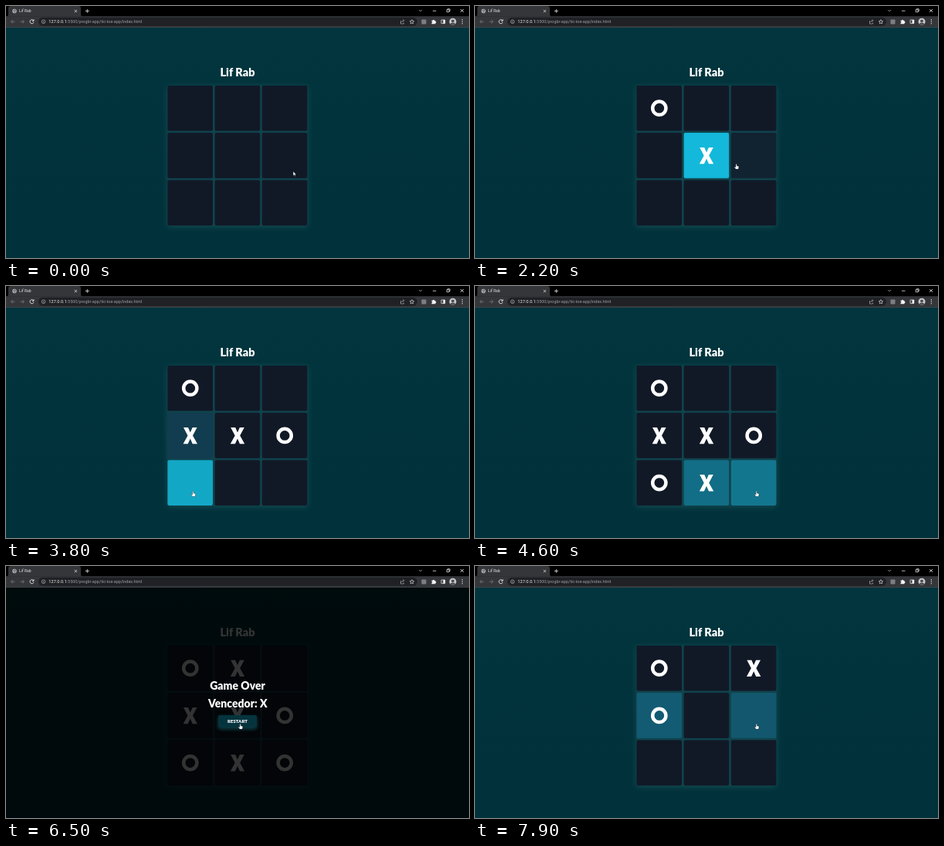
An HTML page that plays this animation: 600 by 326 pixels, repeating every 8 s.

```html
<!DOCTYPE html>
<html lang="en">
<head>
<meta charset="utf-8">
<title>Lif Rab</title>
<style>
  html, body { margin: 0; width: 100%; height: 100%; overflow: hidden; background: #01323b; }
  svg { display: block; width: 100vw; height: 100vh; }
  .ui { font-family: Roboto, "Open Sans", sans-serif; }
  .head { font: 900 14px Lato, "Open Sans", sans-serif; fill: #fff; text-anchor: middle; }
  .line { fill: none; stroke: #e4e6e8; stroke-width: .8; }
</style>
</head>
<body>
<svg viewBox="0 0 600 326" preserveAspectRatio="none">
  <defs>
    <linearGradient id="sky" x2="0" y2="1">
      <stop stop-color="#02353e"/><stop offset="1" stop-color="#01313a"/>
    </linearGradient>
    <filter id="blur" x="-20%" y="-20%" width="140%" height="140%"><feGaussianBlur stdDeviation="3.5"/></filter>
    <filter id="soft" x="-30%" y="-80%" width="160%" height="260%"><feGaussianBlur stdDeviation="2.4"/></filter>
    <clipPath id="face"><circle cx="579" cy="20.3" r="4.5"/></clipPath>
  </defs>

  <!-- page -->
  <rect y="27" width="600" height="299" fill="url(#sky)"/>
  <text class="head" x="300" y="91" style="font-size:14.5px">Lif Rab</text>
  <rect x="209" y="104" width="182" height="182" rx="3" fill="#38767d" opacity=".36" filter="url(#blur)"/>
  <rect x="209.5" y="103" width="181" height="180.5" rx="2" fill="#10434c"/>
  <g id="board"></g>

  <!-- result -->
  <g id="over">
    <rect y="27" width="600" height="299" fill="#000" opacity=".8"/>
    <text class="head" x="300" y="160">Game Over</text>
    <text class="head" x="300.3" y="183">Vencedor: X</text>
    <rect x="275" y="195" width="50" height="16" rx="2" fill="#17606c" opacity=".65" filter="url(#soft)"/>
    <rect x="275" y="193" width="50" height="15.5" rx="2" fill="#05343e"/>
    <text class="head" x="300" y="203" style="font-size:6.1px">RESTART</text>
  </g>

  <!-- browser -->
  <g class="ui">
    <rect width="600" height="13.5" fill="#000"/>
    <path d="M0 13.5Q3 13.5 3 10.5V3Q3 0 6 0H94Q97 0 97 3V10.5Q97 13.5 100 13.5Z" fill="#35363a"/>
    <rect y="13.3" width="600" height="14" fill="#35363a"/>
    <rect y="27" width="600" height=".7" fill="#4a5054"/>
    <rect x="42" y="14.8" width="491" height="11" rx="5.5" fill="#202124"/>
    <circle cx="11" cy="6.6" r="2.8" fill="#aeb3b8"/>
    <path d="M8.7 6h2l1 1.2-1 1.8M11.3 4.2l.4 1.3 1.7.4" fill="none" stroke="#44474b" stroke-width=".8"/>
    <text x="17" y="8.4" font-size="5" fill="#e3e5e8">Lif Rab</text>
    <text x="55.3" y="22.2" font-size="5.43" fill="#9aa0a6"><tspan font-size="5.65" fill="#f1f3f4">127.0.0.1</tspan>:5500/progbr-app/tic-toe-app/index.html</text>
    <g class="line">
      <path d="M88.8 5l3.2 3.2m0-3.2l-3.2 3.2M102.8 6.5h5m-2.5-2.5v5"/>
      <path d="M535.2 5l2 2 2-2" stroke="#aaa"/>
      <path d="M553 6.3h4.4M571.2 4.8h3v3h-3zM572.2 4.7v-.9h3v3h-.9M589 4l4 4m0-4l-4 4"/>
      <path d="M11.5 20.3h-5m2.3-2.3l-2.3 2.3 2.3 2.3M18.5 20.3h5m-2.3-2.3l2.3 2.3-2.3 2.3" stroke="#777a7e"/>
      <path d="M35.5 18.7a2.5 2.5 0 1 0 .4 2.4M36 17.3v2h-2" stroke-width="1"/>
      <circle cx="48.6" cy="20.3" r="2.3" stroke="#b4b8bc" stroke-width=".7"/>
      <path d="M48.6 20v1.4m0-2.5v.5" stroke="#b4b8bc"/>
      <path d="M511.5 19v4h4v-1.5M512.8 21q.2-2.2 3-2.2m-1.3-1.4l1.4 1.4-1.4 1.4" stroke="#a8acb0" stroke-width=".7"/>
      <path d="M526 17.6l.8 1.8 2 .2-1.5 1.3.4 2-1.7-1-1.7 1 .4-2-1.5-1.3 2-.2z" stroke-width=".65"/>
      <rect x="564" y="18" width="4.8" height="4.6" rx=".4"/>
    </g>
    <rect x="538.5" y="17.5" width="6" height="6" rx=".8" fill="#7c7f83"/>
    <path d="M551.5 18.7h1.5a1 1 0 0 1 2 0h1.5v1.3a1 1 0 0 1 0 2v1.3h-5v-1.5a.9.9 0 0 0 0-1.8z" fill="#f1f3f4"/>
    <rect x="566.5" y="18" width="2.5" height="4.6" fill="#f1f3f4"/>
    <g clip-path="url(#face)">
      <rect x="574" y="15" width="10" height="11" fill="#c9cbcd"/>
      <circle cx="579" cy="19.3" r="1.9" fill="#4b4d50"/>
      <ellipse cx="579" cy="25" rx="3.5" ry="3.4" fill="#4b4d50"/>
    </g>
    <path d="M591.3 17.7v.1m0 2.4v.1m0 2.4v.1" stroke="#f1f3f4" stroke-width="1.2" stroke-linecap="round"/>
  </g>

  <g id="arrow"><path d="M0 0V5.4L1.3 4.2 2.2 6.1 3.1 5.7 2.2 3.9H3.9Z" fill="#fff" stroke="#111" stroke-width=".35"/></g>
  <g id="hand"><path d="M-.7 .6Q0 -.5 .6 .6V2.6L2.6 3.1Q3.3 3.3 3.2 4.2L2.7 7H-.7L-2.5 4.5Q-2.5 3.5-1.5 4L-.7 4.7Z" fill="#fff" stroke="#111" stroke-width=".35"/></g>
</svg>

<script>
const LOOP = 8000, FADE = 400, STEP = 10;
const TRAVEL = 110;     // pointer time between two cells
const PRESS = 20;       // click this long before leaving a cell
const BASE = [17, 25, 39], HOVER = [20, 202, 238];
const LEFT = 209.4, TOP = 102.9, PITCH = 61.2, SIZE = 58.6;
const LINES = "012 345 678 036 147 258 048 246".split(" ");

// pointer wanders over the window, then hops: cell, time it leaves
const wander = [[372, 214], [420, 243], [562, 100], [40, 12], [52, 6]];
const WANDER_STEP = 330, PLAY = WANDER_STEP * (wander.length - 1);
const hops = [
  [0, 1755], [4, 2138], [5, 2490], [4, 2892], [3, 3450], [6, 3930], [7, 4345], [8, 4840],
  [1, 5300], [4, 6530], [0, 6910], [2, 7270], [3, 7680], [5, LOOP + TRAVEL]
];

const $ = id => document.getElementById(id);
const show = (el, on) => el.setAttribute("visibility", on ? "visible" : "hidden");
const corner = i => [LEFT + PITCH * (i % 3), TOP + PITCH * Math.floor(i / 3)];

const keys = wander.map((p, i) => [i * WANDER_STEP, p]);
for (const [cell, leave] of hops) {
  const [x, y] = corner(cell), rest = [x + 33, y + 40];
  keys.push([keys[keys.length - 1][0] + TRAVEL, rest], [leave, rest]);
}

function pointer(t) {
  const i = keys.findIndex(k => k[0] > t);
  const [t0, a] = keys[i - 1], [t1, b] = keys[i];
  return a.map((v, n) => v + (b[n] - v) * (t - t0) / (t1 - t0));
}

function cellAt([x, y]) {
  const col = Math.floor((x - LEFT) / PITCH), row = Math.floor((y - TOP) / PITCH);
  return col >= 0 && col < 3 && row >= 0 && row < 3 ? row * 3 + col : -1;
}

// replays clicks and hover fades up to time t
function simulate(t) {
  const glow = Array(9).fill(0);
  let board = Array(9).fill(""), turn = "O", over = false, next = 0;

  function click(cell) {
    if (over) {
      board = Array(9).fill("");
      turn = "O";
      over = false;
    } else if (!board[cell]) {
      board[cell] = turn;
      over = LINES.some(line => [...line].every(c => board[c] === turn));
      turn = turn === "O" ? "X" : "O";
    }
  }

  for (let s = PLAY; s <= t; s += STEP) {
    if (s >= hops[next][1] - PRESS) click(hops[next++][0]);
    const hot = over ? -1 : cellAt(pointer(s));
    for (let i = 0; i < 9; i++) {
      const change = (i === hot ? STEP : -STEP) / FADE;
      glow[i] = Math.min(1, Math.max(0, glow[i] + change));
    }
  }
  return { board, glow, over };
}

function add(parent, tag, attrs) {
  const el = document.createElementNS("http://www.w3.org/2000/svg", tag);
  for (const k in attrs) el.setAttribute(k, attrs[k]);
  return parent.appendChild(el);
}

const cells = Array.from({ length: 9 }, (_, i) => {
  const g = add($("board"), "g", { transform: `translate(${corner(i)})` });
  return {
    box: add(g, "rect", { width: SIZE, height: SIZE, rx: 1.8 }),
    O: add(g, "circle", { cx: 29.4, cy: 29.3, r: 8.6, fill: "none", stroke: "#fff", "stroke-width": 4.5 }),
    X: add(g, "path", { transform: "translate(29.4 29.5)", fill: "#fff",
      d: "M-8.8-10.7H-2.8L0-4.2 2.9-10.7H8.8L3.2-.1 9.2 10.7H3L0 3.9-3.1 10.7H-9.2L-3.3-.1Z" })
  };
});

function draw(t) {
  const { board, glow, over } = simulate(t);
  cells.forEach((cell, i) => {
    const rgb = BASE.map((v, n) => Math.round(v + (HOVER[n] - v) * glow[i]));
    cell.box.setAttribute("fill", `rgb(${rgb})`);
    show(cell.O, board[i] === "O");
    show(cell.X, board[i] === "X");
  });
  show($("over"), over);

  const p = pointer(t);
  const onButton = Math.abs(p[0] - 300) < 25 && Math.abs(p[1] - 201) < 8;
  const hand = over ? onButton : t > PLAY && cellAt(p) >= 0;
  show($("hand"), hand);
  show($("arrow"), !hand);
  $(hand ? "hand" : "arrow").setAttribute("transform", `translate(${p})`);
}

const start = performance.now();
function tick() {
  draw((performance.now() - start) % LOOP);
  requestAnimationFrame(tick);
}
tick();
</script>
</body>
</html>
```
